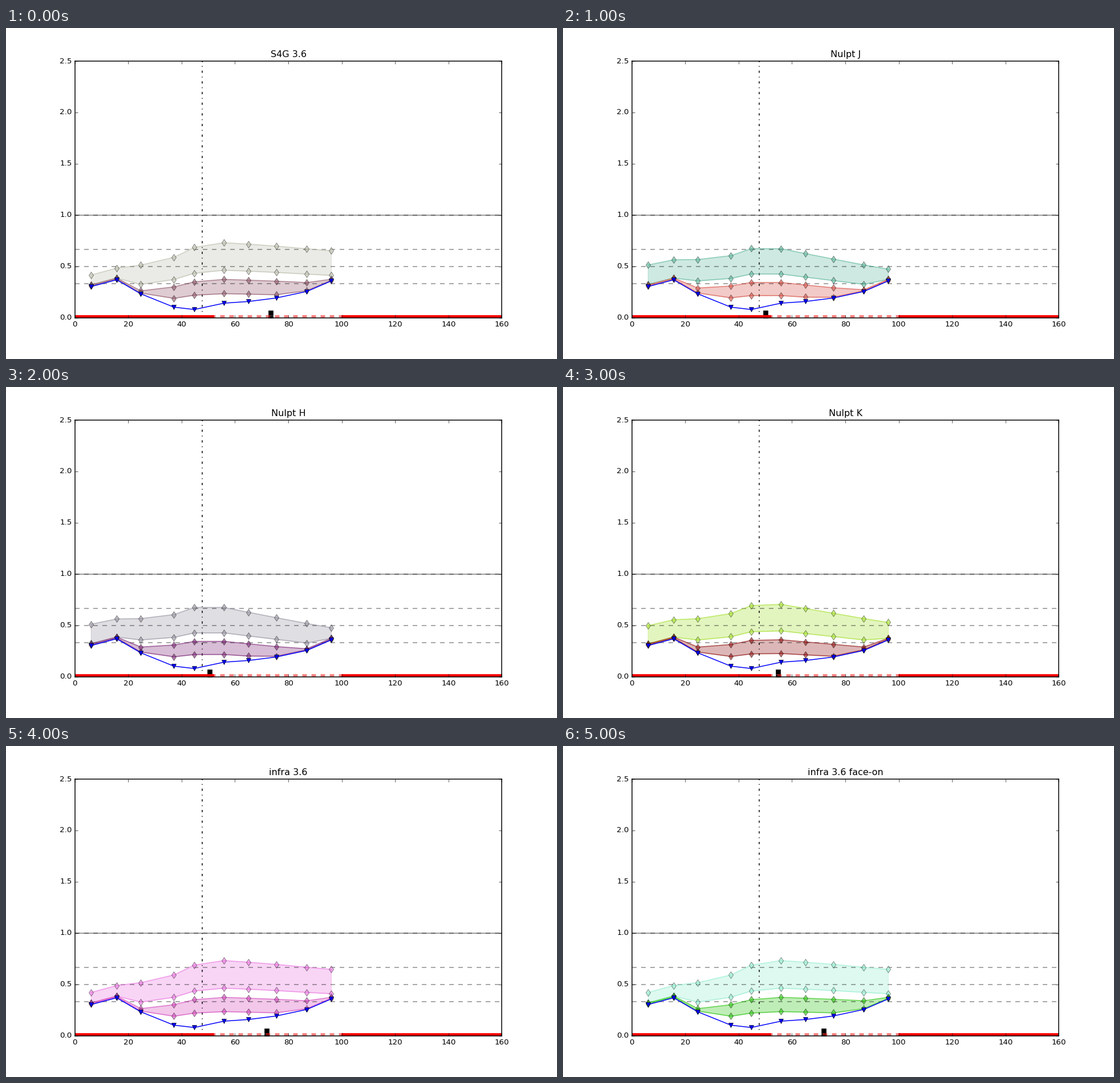
Animation of 966x580 px, one loop 6000 ms. Source, as a matplotlib script:

```python
import numpy as np
import matplotlib.pyplot as plt
from matplotlib.animation import FuncAnimation

LINE = 1.13  # about 1.5 px, so straight lines settle between two pixel rows

plt.style.use("classic")
plt.rcParams.update({
    "font.size": 10,
    "font.sans-serif": ["DejaVu Sans"],
    "figure.facecolor": "white",
    "savefig.facecolor": "white",
    "savefig.dpi": "figure",
    "axes.linewidth": LINE,
    "lines.linewidth": LINE,
})

DPI = 96
fig = plt.figure(figsize=(966 / DPI, 580 / DPI), dpi=DPI)
ax = fig.add_axes([0.125, 0.125, 0.775, 0.775])

# measured radii, gas curve, and stellar curve for scale length H0
R = np.array([6, 15.65, 24.7, 37.1, 44.75, 55.9, 65, 75.4, 86.9, 96])
GAS = np.array([.302, .369, .232, .102, .079, .141, .157, .191, .255, .357])
STARS = np.array([.421, .489, .517, .592, .688, .732, .716, .695, .667, .646])
H0 = 71.9

# title, scale length, amplitude, upper and lower band colours
CASES = [
    ("S4G 3.6", 73.3, 0.985, "#bcbfad", "#92586c"),
    ("Nulpt J", 50.0, 1.261, "#5fb99e", "#d75248"),
    ("Nulpt H", 50.4, 1.255, "#9894a2", "#7d2676"),
    ("Nulpt K", 54.7, 1.209, "#a4e12e", "#911212"),
    ("infra 3.6", H0, 1, "#eb76e1", "#d448bc"),
    ("infra 3.6 face-on", H0, 1, "#94eed0", "#2dc612"),
]


def band(top, bottom, color):
    ax.fill_between(R, bottom, top, color=color, alpha=0.3)
    for y in (top, bottom):
        ax.plot(R, y, color=color, marker="d", ms=6.5, alpha=0.6)


def guides():
    ax.axhline(1, color="black", alpha=0.5)
    for y in (1 / 3, 1 / 2, 2 / 3, 1):
        ax.axhline(y, color="black", ls="--", alpha=0.45)
    ax.axvline(47.65, color="black", ls="-.")


def baseline(h):
    ax.plot([h, h], [0, 0.05], "ks", ls="none")
    ax.plot([0, 50.9], [0, 0], "r", lw=8)
    ax.plot([50.9, 101], [0, 0], "r--", lw=8, alpha=0.5)
    ax.plot([101, 160], [0, 0], "r", lw=8)


def draw(i):
    title, h, amp, upper, lower = CASES[i]
    top = amp * STARS * np.exp(0.93 * R * (1 / H0 - 1 / h))
    mid = np.maximum(top / 1.58, GAS + 0.017)
    high = np.maximum(top / 1.96, GAS + 0.017)
    low = np.maximum(top / 3.12, GAS + 0.008)

    ax.cla()
    guides()
    band(top, mid, upper)
    band(high, low, lower)
    ax.plot(R, GAS, "b", marker="v")
    baseline(h)
    ax.set_xlim(0, 160)
    ax.set_ylim(0, 2.5)
    ax.set_title(title)
    return []


anim = FuncAnimation(fig, draw, frames=len(CASES), interval=1000,
                     init_func=lambda: draw(0), repeat=True, repeat_delay=0)
plt.show()
```
